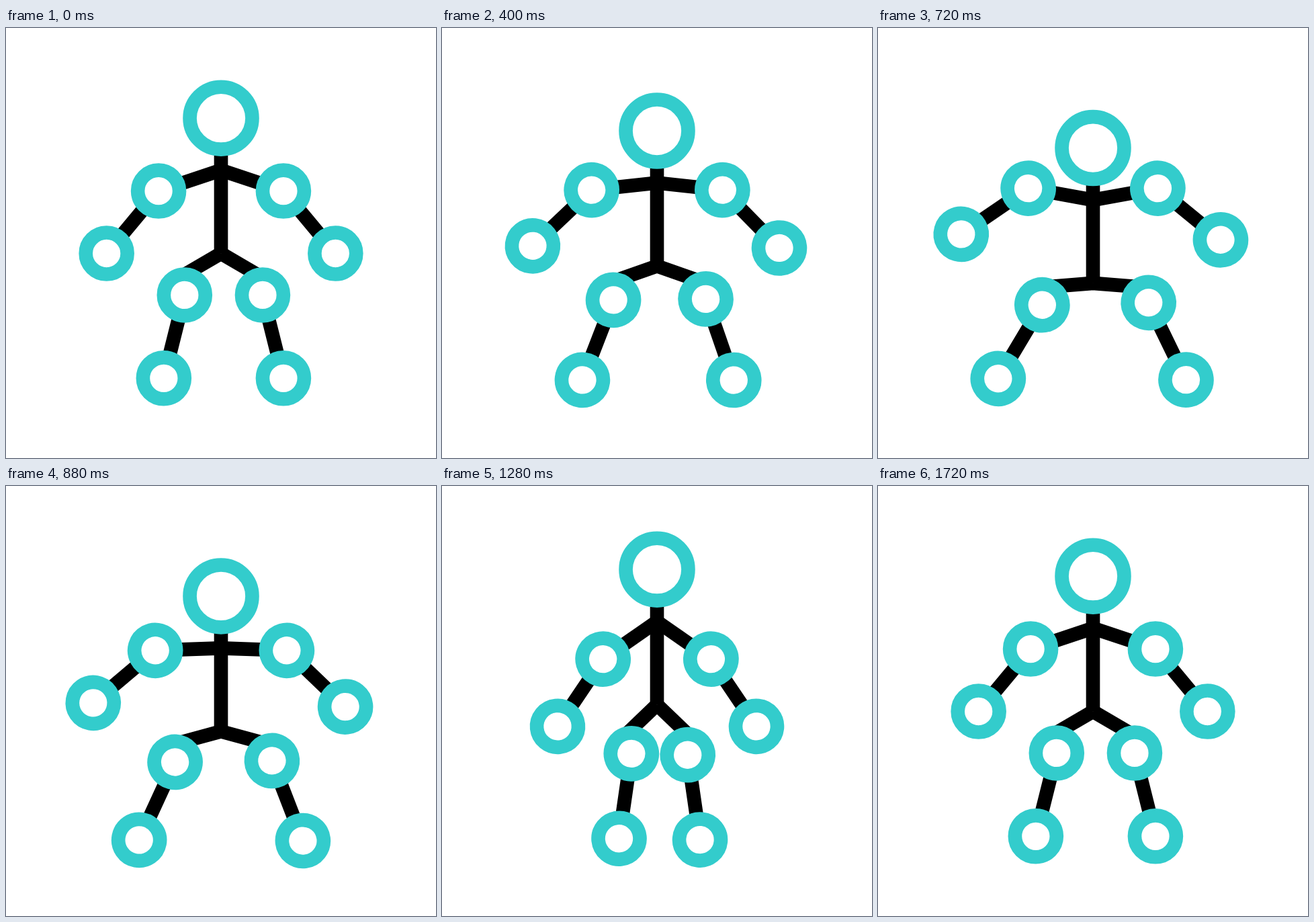
An HTML page that plays this animation: 640x640 px, repeating every 1.92 s.

```html
<!DOCTYPE html>
<html lang="en">
<head>
<meta charset="utf-8">
<title>Jumping figure</title>
<style>
  html, body { margin: 0; width: 100%; height: 100%; overflow: hidden; background: #fff; }
  svg { display: block; width: 100%; height: 100%; }
  line { stroke: #000; stroke-width: 2; }
  circle { fill: #fff; stroke: #3cc; stroke-width: 2; }
</style>
</head>
<body>
<svg viewBox="0 0 62 62">
  <g id="figure">
    <line x1="31" y1="15" x2="31" y2="32.5"/>
    <circle cx="31" cy="13" r="4.5"/>
  </g>
</svg>
<script>
  const LOOP = 1920, STEP = 40, START = 160, PHASE = 520;
  const SHOULDER = [31, 20.5], HIP = [31, 32.5];
  const figure = document.getElementById('figure');

  // Poses run rest, crouch, jump, rest.
  const DROP = [0, 4.34, -1, 0];

  // side: 1 left, -1 right; upper and lower are angles in degrees per pose,
  // the lower one relative to the upper.
  const limbs = [
    { side: 1, root: SHOULDER, mid: [22, 23.5], end: [14.5, 32.5],
      upper: [0, 29, -17, 0], lower: [0, -13, 11, 0] },
    { side: -1, root: SHOULDER, mid: [40, 23.5], end: [47.5, 32.5],
      upper: [0, 29, -17, 0], lower: [0, -18, 11, 0] },
    { side: 1, root: HIP, mid: [25.75, 38.5], end: [22.75, 50.5], thigh: [25, 36],
      upper: [0, 26, -14, 0], lower: [0, -9, 8, 0] },
    { side: -1, root: HIP, mid: [37, 38.5], end: [40, 50.5], thigh: [37, 36],
      upper: [0, 26, -14, 0], lower: [0, -14, 8, 0] }
  ];

  function add(parent, tag, attrs = {}) {
    const el = document.createElementNS('http://www.w3.org/2000/svg', tag);
    for (const key in attrs) el.setAttribute(key, attrs[key]);
    return parent.appendChild(el);
  }
  const bone = (parent, [x1, y1], [x2, y2]) => add(parent, 'line', { x1, y1, x2, y2 });
  const ring = (parent, [cx, cy]) => add(parent, 'circle', { cx, cy, r: 3 });

  for (const limb of limbs) {
    limb.outer = add(figure, 'g');
    bone(limb.outer, limb.root, limb.thigh || limb.mid);
    limb.inner = add(limb.outer, 'g');
    bone(limb.inner, limb.mid, limb.end);
    ring(limb.inner, limb.end);
    ring(limb.outer, limb.mid);
  }

  // cubic-bezier(p, 0, 1 - p, 1), solved by bisection
  function ease(x, p = 0.525) {
    let lo = 0, hi = 1;
    for (let i = 0; i < 24; i++) {
      const m = (lo + hi) / 2, n = 1 - m;
      const bx = 3 * n * n * m * p + 3 * n * m * m * (1 - p) + m * m * m;
      if (bx < x) lo = m; else hi = m;
    }
    return lo * lo * (3 - 2 * lo);
  }

  function turn(el, angle, [x, y]) {
    el.setAttribute('transform', `rotate(${angle} ${x} ${y})`);
  }

  function draw(time) {
    const t = Math.floor((time % LOOP) / STEP) * STEP;
    const pos = Math.min(Math.max((t - START) / PHASE, 0), 3);
    const i = Math.min(Math.floor(pos), 2);
    const k = ease(pos - i);
    const mix = poses => poses[i] + (poses[i + 1] - poses[i]) * k;

    figure.setAttribute('transform', `translate(0 ${mix(DROP)})`);
    for (const limb of limbs) {
      turn(limb.outer, limb.side * mix(limb.upper), limb.root);
      turn(limb.inner, limb.side * mix(limb.lower), limb.mid);
    }
  }

  let begin;
  function tick(now) {
    if (begin === undefined) begin = now;
    draw(now - begin);
    requestAnimationFrame(tick);
  }
  draw(0);
  requestAnimationFrame(tick);
</script>
</body>
</html>
```
